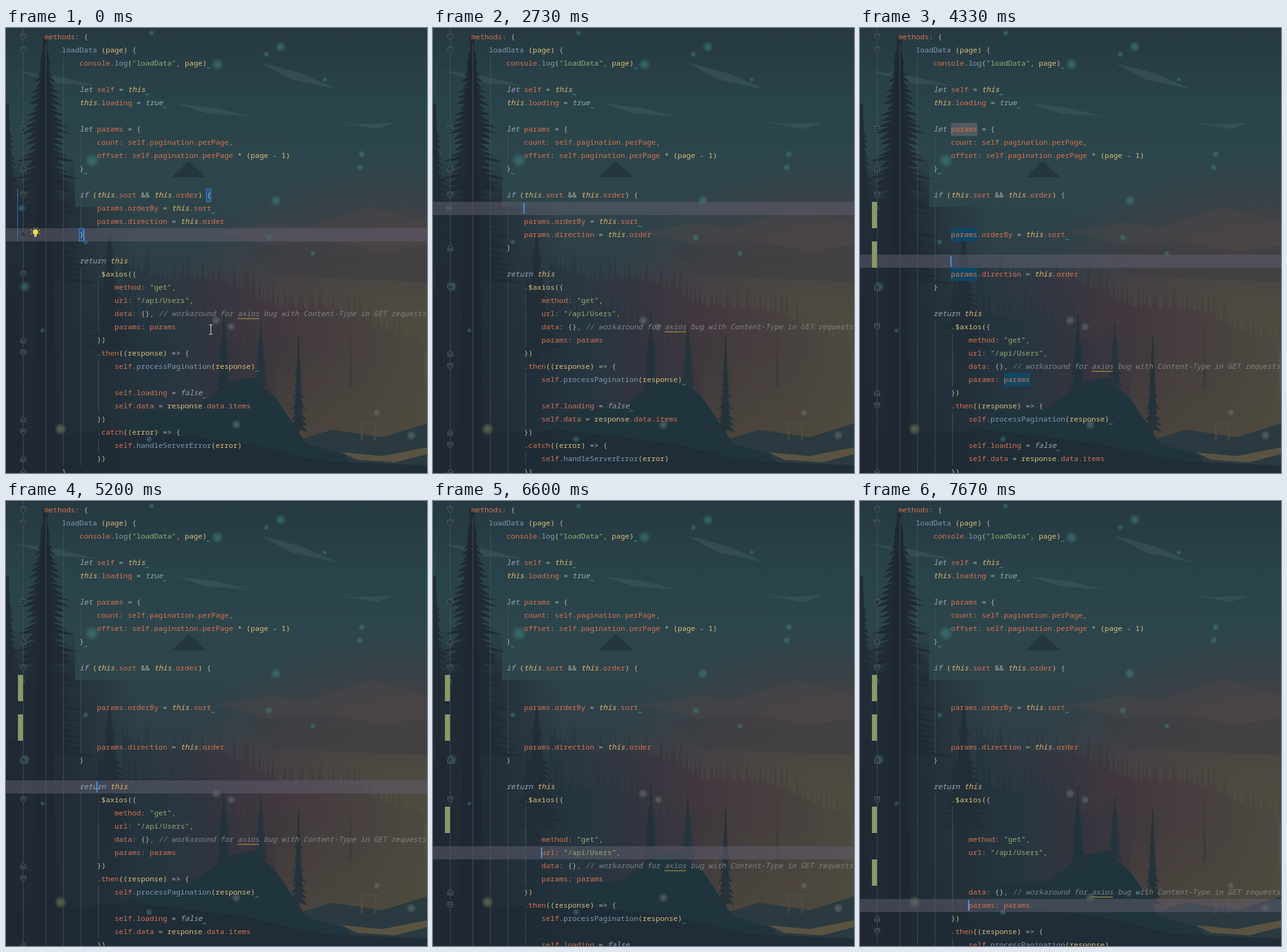
An HTML page with a canvas that plays this animation: 671x709 px, repeating every 8 s.

```html
<!DOCTYPE html>
<html lang="en">
<head>
<meta charset="utf-8">
<title>Code editor</title>
<style>
html, body { margin: 0; width: 100%; height: 100%; overflow: hidden; background: #25363f; }
canvas, svg { position: absolute; left: 0; top: 0; width: 671px; height: 709px; }
text { font: 11.667px "Noto Sans Mono", "DejaVu Sans Mono", monospace; white-space: pre; }
.comment { fill: #7b8285; font-style: italic; }
.string { fill: #97ab6c; }
.keyword { fill: #9aa5b4; font-style: italic; }
.this { fill: #e2b76b; font-style: italic; }
.call { fill: #8299ad; }
.param { fill: #dcbf78; }
.name { fill: #d9714c; }
.dot { fill: #cf8a5c; }
.mark { fill: #b4b29f; }
.wave { fill: none; stroke: #35a083; }
.warn { fill: none; stroke: #c2a743; }
.guide { stroke: #4a585e; stroke-opacity: .75; }
.fold { fill: #25323a; stroke: #56646a; }
.match { fill: #24538c; stroke: #4b83c6; }
</style>
</head>
<body>
<canvas id="scene" width="671" height="709"></canvas>
<svg viewBox="0 0 671 709">
  <g id="editor"></g>
  <g id="mouse" fill="none">
    <path d="M-3-7.5h2.5l.5.5.5-.5H3M0-7V7M-3 7.5h2.5L0 7l.5.5H3" stroke="#1c252b" stroke-width="2.4" opacity=".5"/>
    <path d="M-3-7.5h2.5l.5.5.5-.5H3M0-7V7M-3 7.5h2.5L0 7l.5.5H3" stroke="#d6dbdc" stroke-width="1.1"/>
  </g>
</svg>
<script>
const W = 671, H = 709, LOOP = 8000, ROW = 21, CHAR = 7;
const colX = c => 61 + c * CHAR;
const rowY = r => 4 + r * ROW;

// ---------- scenery ----------
const ctx = document.getElementById('scene').getContext('2d');
let seed = 11;
const rnd = () => (seed = (seed * 16807) % 2147483647) / 2147483647;

function fade(x0, y0, x1, y1, ...colors) {
  const g = ctx.createLinearGradient(x0, y0, x1, y1);
  colors.forEach((c, i) => g.addColorStop(i / (colors.length - 1), c));
  return g;
}

function shape(fill, ...pts) {
  ctx.fillStyle = fill;
  ctx.beginPath();
  for (let i = 0; i < pts.length; i += 2) ctx.lineTo(pts[i], pts[i + 1]);
  ctx.fill();
}

function tree(x, top, h, w, fill) {
  const n = Math.max(5, Math.round(h / 9)), left = [], right = [];
  for (let i = 1; i <= n; i++) {
    const y = top + h * i / n, r = w * (i / n) * (.65 + rnd() * .5);
    right.push(x + r, y + rnd() * 3, x + r * .4, y - 1);
    left.unshift(x - r * .4, y - 1, x - r * .95, y + rnd() * 3);
    // pairs are unshifted in drawing order from the bottom up
    [left[0], left[1], left[2], left[3]] = [left[2], left[3], left[0], left[1]];
    left.unshift(...left.splice(0, 4).reduce((a, v, j, s) => j % 2 ? a : [s[j], s[j + 1], ...a], []));
  }
  shape(fill, x, top, ...right, ...left);
  ctx.fillRect(x - w * .06, top, w * .12 + .5, h * 1.15);
}

function ridge(x0, x1, step, curve, size, fill) {
  const pts = [];
  for (let x = x0; x <= x1; x += step) pts.push(x, curve(x) + size * .7);
  shape(fill, x0, H, ...pts, x1, H);
  for (let x = x0; x <= x1; x += step) {
    const h = size * (.7 + rnd() * .8);
    tree(x + rnd() * 4, curve(x) + size - h, h + 6, h * .17, fill);
  }
}

function drawScene() {
  ctx.fillStyle = fade(0, 0, 0, H, '#263942', '#29434a', '#2d464c', '#2e4048', '#2a3a43', '#263741', '#22323c');
  ctx.fillRect(0, 0, W, H);

  ctx.save();
  ctx.translate(640, 545);
  ctx.scale(1.25, 1);
  const glow = ctx.createRadialGradient(0, 0, 0, 0, 0, 350);
  [[0, '#555040'], [.35, '#4d4840'], [.62, 'rgba(71,65,68,.92)'], [.82, 'rgba(62,65,69,.55)'], [1, 'rgba(55,68,72,0)']]
    .forEach(s => glow.addColorStop(...s));
  ctx.fillStyle = glow;
  ctx.fillRect(-640, -545, W, H);
  ctx.restore();

  const cloud = 'rgba(75,102,103,.35)';
  shape(cloud, 15, 68, 75, 75, 145, 92, 80, 88);
  shape(cloud, 525, 149, 560, 153, 621, 151, 590, 161);
  shape(cloud, 405, 55, 470, 72, 530, 98, 455, 82);
  shape(cloud, 270, 120, 330, 127, 390, 141, 320, 136);
  shape('rgba(35,52,59,.8)', 264, 238, 291, 212, 320, 238);
  shape('rgba(80,72,72,.35)', 330, 325, 420, 310, 480, 318, 580, 285, W, 310, W, 372, 460, 355);
  shape('rgba(57,59,64,.4)', 380, 352, 500, 338, 600, 356, W, 346, W, 405, 430, 395);

  ridge(185, W, 8, x => 352 + (x - 185) * .24 + 9 * Math.sin(x / 31), 32,
    fade(185, 0, W, 0, '#263841', '#333640', '#43373f', '#47403f', '#4d493f'));
  ridge(150, 560, 11, x => 405 + (x - 150) * .26 + 10 * Math.sin(x / 26), 42,
    fade(150, 0, 560, 0, '#22313b', '#263641', '#35343e', '#413a3d', 'rgba(75,70,62,0)'));
  ctx.fillStyle = fade(0, 520, 0, 660, 'rgba(80,76,60,0)', 'rgba(79,75,60,.55)');
  ctx.fillRect(430, 520, 241, 140);

  shape('#2a3a40', 470, 655, 520, 640, 600, 652, W, 630, W, H, 440, H);
  const hill = '#20343e';
  shape(hill, 120, H, 220, 610, 300, 605, 355, 565, 395, 556, 432, 592, 478, 662, 540, 680, 560, H);
  tree(347, 455, 125, 15, '#22323c');
  tree(406, 470, 100, 13, '#25343d');
  tree(466, 492, 150, 15, '#25323a');
  tree(549, 480, 95, 4, 'rgba(58,58,55,.55)');
  shape('#5a5341', 535, 676, 600, 682, W, 668, W, 679, 620, 692, 560, 688);
  shape('#1e2d37', 0, 655, 200, 640, 380, 662, 500, 690, W, 697, W, H, 0, H);
  ctx.fillStyle = 'rgba(86,80,62,.5)';
  [565, 586].forEach(x => ctx.fillRect(x, 629, 4, 28));
  ctx.fillRect(562, 627, 31, 3);

  ctx.fillStyle = fade(0, 0, 210, 0, 'rgba(31,39,50,.95)', 'rgba(31,40,51,.7)', 'rgba(32,43,53,0)');
  ctx.fillRect(0, 285, 210, 424);
  ctx.fillStyle = fade(0, 200, 0, 285, 'rgba(31,39,50,0)', 'rgba(31,39,50,.8)');
  ctx.fillRect(0, 200, 110, 85);
  tree(62, 12, 245, 56, '#202a34');
  tree(62, 150, 255, 92, '#202a35');
  tree(2, 120, 260, 40, '#212c36');
  tree(165, 328, 190, 42, '#212e38');
  shape('#1f2832', 56, 40, 68, 40, 82, H, 40, H);

  const dots = [337, 58, 8, 438, 30, 7, 430, 275, 7, 30, 412, 7, 367, 632, 6, 335, 466, 6, 137, 211, 10,
    567, 201, 4, 564, 222, 4, 359, 476, 5, 25, 287, 5, 591, 613, 4, 646, 649, 6, 228, 655, 4, 508, 82, 2,
    232, 8, 3, 415, 42, 3, 127, 341, 3, 489, 359, 3, 419, 334, 4, 58, 482, 2, 87, 639, 8];
  for (let i = 0; i < dots.length; i += 3) {
    const [x, y, r] = dots.slice(i, i + 3);
    const rgb = x === 87 ? '126,139,84' : y > 440 && x > 300 ? '104,124,112' : '64,132,130';
    const g = ctx.createRadialGradient(x, y, 0, x, y, r + 2);
    g.addColorStop(0, `rgba(${rgb},.6)`);
    g.addColorStop(.5, `rgba(${rgb},.4)`);
    g.addColorStop(1, `rgba(${rgb},0)`);
    ctx.fillStyle = g;
    ctx.fillRect(x - 12, y - 12, 24, 24);
  }
}

// ---------- code ----------
// A trailing ~ marks a missing semicolon.
const code = `methods: {
    loadData (page) {
        console.log("loadData", page)~

        let self = this~
        this.loading = true~

        let params = {
            count: self.pagination.perPage,
            offset: self.pagination.perPage * (page - 1)
        }~

        if (this.sort && this.order) {
            params.orderBy = this.sort~
            params.direction = this.order
        }

        return this
            .$axios({
                method: "get",
                url: "/api/Users",
                data: {}, // workaround for axios bug with Content-Type in GET requests
                params: params
            })
            .then((response) => {
                self.processPagination(response)~

                self.loading = false~
                self.data = response.data.items
            })
            .catch((error) => {
                self.handleServerError(error)
            })
    }`.split('\n');

// at, caret row, caret column, then what else changes
const events = [
  [0, 15, 9, { braces: true, bulb: true }],
  [1600, 12, 21, {}],
  [1930, 12, 21, { word: 'sort' }],
  [2400, 13, 12, { add: true }],
  [2730, 13, 12, { word: '' }],
  [3000, 14, 12, { add: true, bar: true }],
  [3470, 15, 12, {}],
  [3800, 15, 12, { word: 'params' }],
  [4070, 16, 12, { add: true }],
  [4330, 17, 12, { add: true, bar: true }],
  [4600, 18, 12, { word: '' }],
  [4930, 19, 9, { braces: true }],
  [5070, 20, 0, {}],
  [5200, 21, 12, {}],
  [5400, 22, 12, {}],
  [5870, 23, 16, { add: true }],
  [6200, 24, 16, { add: true, bar: true }],
  [6470, 25, 16, {}],
  [6600, 26, 16, {}],
  [7070, 27, 16, { add: true }],
  [7400, 28, 16, { add: true, bar: true }],
  [7530, 29, 16, {}],
  [7670, 30, 16, {}]
];

const kinds = ['comment', 'string', 'keyword', 'this', 'call', 'param', 'name', 'dot', 'mark'];
const tokens = /(\/\/.*)|("[^"]*")|\b(let|return|if|true|false)\b|\b(this)\b|\b(loadData|log|processPagination|handleServerError)\b|(\b(?:page|response|error|1)\b|\$axios|[()])|(\w+)|([.,:])|([^\s\w.,:()"$]+)/g;
const escape = s => s.replace(/&/g, '&amp;').replace(/</g, '&lt;').replace(/>/g, '&gt;');
const rect = (x, y, w, h, attrs) => `<rect x="${x}" y="${y}" width="${w}" height="${h}" ${attrs}/>`;
const path = (d, cls) => `<path d="${d}" class="${cls}"/>`;

function wave(x, y, w, cls) {
  let d = `M${x} ${y + 1}`;
  for (let i = 2; i <= w; i += 2) d += `L${x + i} ${y + (i % 4 ? -1 : 1)}`;
  return path(d, cls);
}

function indents(lines) {
  const own = lines.map(l => l.trim() ? l.search(/\S/) : -1);
  return own.map((n, i) => {
    if (n >= 0) return n;
    const before = own.slice(0, i).reverse().find(v => v >= 0);
    const after = own.slice(i).find(v => v >= 0);
    return Math.max(before, after);
  });
}

function drawLine(line, r, indent, word) {
  const y = rowY(r), mid = y + 10;
  const text = line.replace('~', '');
  let out = '';
  for (let c = 0; c < indent; c += 4)
    out += path(`M${colX(c) + 2.5} ${y}v${ROW}`, 'guide');
  if (word) {
    for (const m of text.matchAll(new RegExp(`\\b${word}\\b(?!:)`, 'g'))) {
      const fill = text.includes('let ' + word) ? '#535b60' : '#0f4766';
      out += rect(colX(m.index), y, word.length * CHAR, ROW, `fill="${fill}"`);
    }
  }
  for (const m of text.matchAll(tokens)) {
    const kind = kinds[m.slice(1).findIndex(Boolean)];
    out += `<text x="${colX(m.index)}" y="${y + 14}" class="${kind}">${escape(m[0])}</text>`;
  }
  if (line.endsWith('~')) out += wave(colX(text.length), y + 18, 6, 'wave');
  if (text.includes('// ')) out += wave(colX(text.indexOf('axios')), y + 18, 35, 'warn');
  if (text.endsWith('{')) out += path(`M23.5 ${mid - 4.5}h8v5l-4 4-4-4zM25.5 ${mid - 1.5}h4`, 'fold');
  if (/^\s*}/.test(text)) out += path(`M23.5 ${mid + 4.5}h8v-5l-4-4-4 4zM25.5 ${mid + 1.5}h4`, 'fold');
  return out;
}

function bulb(x, y) {
  let rays = '';
  for (let a = -200; a <= 20; a += 44) {
    const c = Math.cos(a * Math.PI / 180), s = Math.sin(a * Math.PI / 180);
    rays += `M${x + c * 5.8} ${y + s * 5.8}L${x + c * 7.6} ${y + s * 7.6}`;
  }
  return `<circle cx="${x}" cy="${y}" r="4.3" fill="#f5d94f"/>` +
    `<path d="${rays}" stroke="#e6cb50" stroke-width="1.2"/>` +
    rect(x - 2, y + 4, 4, 1.5, 'fill="#f5d94f"') + rect(x - 2, y + 6, 4, 1.4, 'fill="#d9dcdc"');
}

function drawEditor(count) {
  const lines = code.slice();
  let word = '', bars = '';
  for (const [, row, , change] of events.slice(0, count)) {
    if (change.add) lines.splice(row, 0, '');
    if (change.bar) bars += rect(19, rowY(row - 1), 8, ROW * 2, 'fill="#8a9a66"');
    if ('word' in change) word = change.word;
  }
  const [, row, col, { braces, bulb: lit }] = events[count - 1];
  let out = rect(0, rowY(row), W, ROW, 'fill="#625e70" fill-opacity=".5"');
  out += path(`M27.5 0V${H}`, 'guide') + bars;
  if (braces) {
    out += rect(18, rowY(12), 1, ROW * (row - 11), 'fill="#3f74b8"');
    out += rect(colX(37) - .5, rowY(12) + .5, CHAR, ROW - 1, 'class="match"');
    out += rect(colX(8) - .5, rowY(row) + .5, CHAR, ROW - 1, 'class="match"');
  }
  const depth = indents(lines);
  lines.slice(0, 34).forEach((l, r) => out += drawLine(l, r, depth[r], word));
  if (lit) out += bulb(47, rowY(row) + 6);
  out += rect(colX(col) - 1, rowY(row) + 2, 2, ROW - 4, 'fill="#4a8fdc"');
  document.getElementById('editor').innerHTML = out;
}

// ---------- mouse ----------
const trail = [[0, 326, 480], [66, 325, 478], [250, 300, 425], [450, 250, 325], [600, 215, 268], [700, 203, 249],
  [740, 202, 248], [800, 202, 256], [866, 203, 265], [933, 203, 268], [1000, 203, 272], [1260, 203, 272],
  [1333, 204, 269], [LOOP, 204, 269]];
const mouse = document.getElementById('mouse');

function moveMouse(t) {
  const tick = Math.floor(t / (200 / 3) + .05) * 200 / 3;
  const i = Math.max(1, trail.findIndex(p => p[0] >= tick));
  const [t0, x0, y0] = trail[i - 1], [t1, x1, y1] = trail[i];
  const k = (tick - t0) / (t1 - t0);
  const at = (a, b) => Math.round(a + (b - a) * k) + .5;
  mouse.setAttribute('transform', `translate(${at(x0, x1)} ${at(y0, y1)})`);
  mouse.style.visibility = t < 2400 ? 'visible' : 'hidden';
}

let shown = 0;
const start = performance.now();
function frame() {
  const t = (performance.now() - start) % LOOP;
  const count = events.filter(e => e[0] <= t).length;
  if (count !== shown) drawEditor(shown = count);
  moveMouse(t);
  requestAnimationFrame(frame);
}

drawScene();
frame();
</script>
</body>
</html>
```
